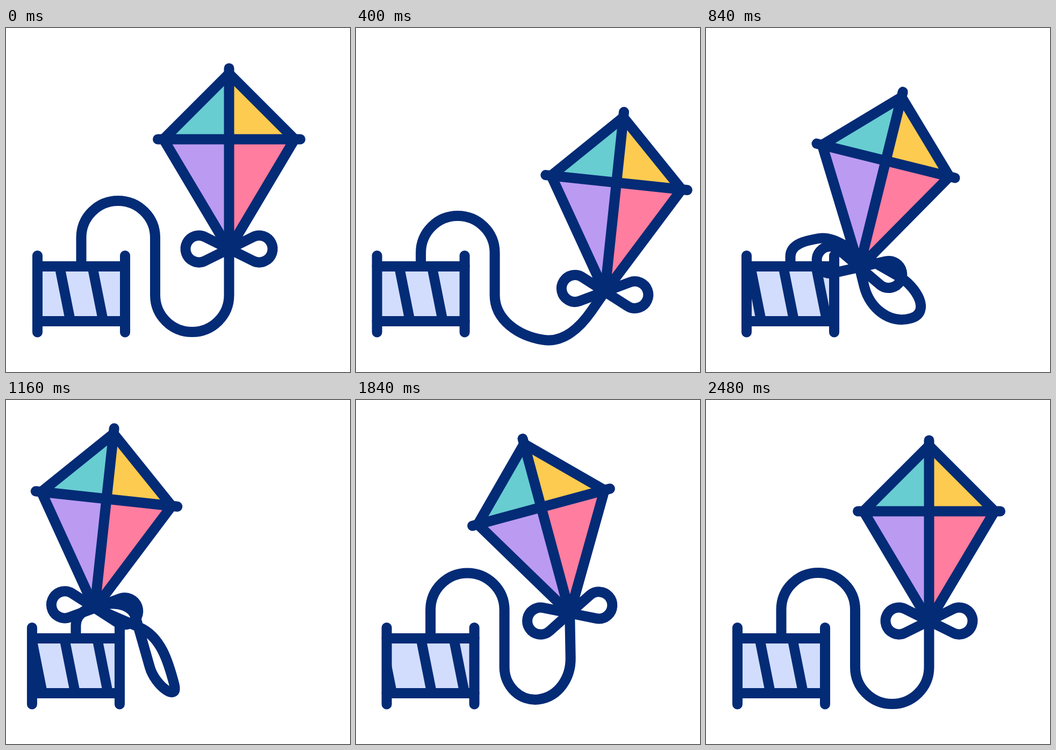
These frames come from a looping animation (640x640 px, 2.76 s). An HTML page with a canvas:

```html
<!DOCTYPE html>
<html lang="en">
<head>
<meta charset="utf-8">
<title>Kite</title>
<style>
  html, body { margin: 0; width: 100%; height: 100%; overflow: hidden; background: #fff; }
  canvas { display: block; width: 640px; height: 640px; }
</style>
</head>
<body>
<canvas id="stage" width="640" height="640"></canvas>
<script>
const ctx = document.getElementById('stage').getContext('2d');
const LOOP = 2760, MOVE_END = 2480, STEP = 40;
const INK = '#042b76', LINE = 19;

// Smooth motion through [time, value] keys; it rests at every turning point.
function follow(t, ...keys) {
  const last = keys.length - 1;
  if (t <= keys[0][0]) return keys[0][1];
  if (t >= keys[last][0]) return keys[last][1];
  const i = keys.findIndex(key => key[0] > t) - 1;
  const slope = n => {
    if (n === 0 || n === last) return 0;
    const [before, here, after] = keys.slice(n - 1, n + 2);
    if ((here[1] - before[1]) * (after[1] - here[1]) <= 0) return 0;
    return (after[1] - before[1]) / (after[0] - before[0]);
  };
  const [t0, from] = keys[i], [t1, to] = keys[i + 1];
  const span = t1 - t0, u = (t - t0) / span;
  return from + (to - from) * u * u * (3 - 2 * u) +
    span * u * (1 - u) * ((1 - u) * slope(i) - u * slope(i + 1));
}

// Rises from 0 to 1, holds, and falls back.
const swell = (t, a, b, c, d) => follow(t, [a, 0], [b, 1], [c, 1], [d, 0]);

function trace(points, closed) {
  ctx.beginPath();
  points.forEach(p => ctx.lineTo(p[0], p[1]));
  if (closed) ctx.closePath();
}

function strokeLine(...points) {
  trace(points);
  ctx.stroke();
}

function fillShape(color, points) {
  trace(points, true);
  ctx.fillStyle = color;
  ctx.fill();
}

function drawSpool(x, scroll) {
  const width = 163, top = 443.5, bottom = 545.5;
  ctx.save();
  ctx.translate(x, 0);
  ctx.save();
  ctx.beginPath();
  ctx.rect(0, top, width, bottom - top);
  ctx.clip();
  ctx.fillStyle = '#d2ddfd';
  ctx.fillRect(0, top, width, bottom - top);
  for (let i = 0; i < 5; i++) {
    const right = 52.5 + 61 * i + (i > 2 ? 13 : 0) + scroll;
    fillShape(INK, [[right - LINE, 453], [right, 453], [right + 16.5, 536], [right + 16.5 - LINE, 536]]);
  }
  ctx.restore();
  for (const y of [top, bottom]) strokeLine([0, y], [width, y]);
  for (const side of [0, width]) strokeLine([side, top - 20], [side, bottom + 20.5]);
  ctx.restore();
}

function heading(from, to) {
  const dx = to[0] - from[0], dy = to[1] - from[1], d = Math.hypot(dx, dy) || 1;
  return [dx / d, dy / d];
}

// Curve from p to q with the handle length of a circular arc of the same turn.
function bend(p, dirP, q, dirQ) {
  const cos = dirP[0] * dirQ[0] + dirP[1] * dirQ[1];
  const turn = Math.acos(Math.max(-1, Math.min(1, cos)));
  const h = Math.hypot(q[0] - p[0], q[1] - p[1]) / (3 * Math.cos(turn / 4) ** 2);
  ctx.bezierCurveTo(p[0] + h * dirP[0], p[1] + h * dirP[1],
    q[0] - h * dirQ[0], q[1] - h * dirQ[1], q[0], q[1]);
}

// An arch rising from the spool, then a dip that leads to the knot.
function drawString(t, spoolX, knot) {
  const fold = swell(t, 500, 840, 1480, 1900);
  const tangle = swell(t, 540, 840, 840, 1160);
  const taut = swell(t, 0, 400, 1480, 1900);
  const drop = 35 * swell(t, 0, 560, 900, 1900);
  const tuck = 0.9 * drop * fold;
  const sway = follow(t, [0, 0], [480, -27], [840, 9], [1160, 83], [1480, 42], [1900, 0]);

  const start = [spoolX + 81.5, 443.5];
  const left = [start[0], 390 + drop];
  const top = [spoolX + 150 - tuck / 2, 321.5 + drop * (1 + fold)];
  const right = [spoolX + 219 - tuck, 390 + drop * (1 - fold / 2)];
  const hinge = [spoolX + 219 + 64 * tangle, 497 - 35 * tangle];
  const exit = [knot[0] + sway, knot[1] + 86 - 50 * taut];
  const low = [(hinge[0] + exit[0]) / 2 + 55 * fold, (hinge[1] + exit[1]) / 2 + 68.5];

  const rise = heading(start, left), over = heading(left, right), fall = heading(right, hinge);
  const under = heading(hinge, exit), lift = heading(exit, knot);
  ctx.beginPath();
  ctx.moveTo(...start);
  ctx.lineTo(...left);
  bend(left, rise, top, over);
  bend(top, over, right, fall);
  ctx.lineTo(...hinge);
  bend(hinge, fall, low, under);
  bend(low, under, exit, lift);
  ctx.lineTo(...knot);
  ctx.stroke();
}

function drawBow(y) {
  const r = 25, dist = 56, angle = Math.acos(r / dist);
  for (const side of [-1, 1]) {
    ctx.save();
    ctx.translate(0, y);
    ctx.scale(side, 1);
    ctx.beginPath();
    ctx.moveTo(0, 0);
    ctx.arc(dist, 0, r, Math.PI + angle, Math.PI - angle);
    ctx.closePath();
    ctx.stroke();
    ctx.restore();
  }
}

function drawKite(x, y, angle) {
  const top = [0, -122], right = [122, 0], bottom = [0, 205], left = [-122, 0], mid = [0, 0];
  ctx.save();
  ctx.translate(x, y);
  ctx.rotate(angle);
  fillShape('#67cdd1', [top, mid, left]);
  fillShape('#fdcb50', [top, right, mid]);
  fillShape('#bb9af2', [left, mid, bottom]);
  fillShape('#ff7d9f', [mid, right, bottom]);
  trace([top, right, bottom, left], true);
  ctx.stroke();
  strokeLine([0, -132], [0, 204]);
  strokeLine([-132.5, 0], [132.5, 0]);
  drawBow(204);
  ctx.restore();
}

function draw(t) {
  const x = follow(t, [0, 415], [510, 494], [840, 334.5], [1160, 187], [1300, 147],
    [1480, 205.5], [1840, 344.5], [2200, 438], [MOVE_END, 415]);
  const y = follow(t, [0, 207], [480, 294], [1340, 170], [2060, 208], [MOVE_END, 207]);
  const tilt = follow(t, [0, 0], [880, 14], [1720, -16.2], [MOVE_END, 0]) * Math.PI / 180;
  const spoolX = follow(t, [0, 58.5], [420, 39], [840, 75.5], [1200, 47.5],
    [1520, 64], [2120, 51.5], [MOVE_END, 58.5]);
  const scroll = follow(t, [400, 0], [840, -34], [1160, -42], [1480, -113],
    [1840, -173.5], [MOVE_END, -196]);
  const knot = [x - 204 * Math.sin(tilt), y + 204 * Math.cos(tilt)];

  ctx.fillStyle = '#fff';
  ctx.fillRect(0, 0, 640, 640);
  ctx.strokeStyle = INK;
  ctx.lineWidth = LINE;
  ctx.lineCap = ctx.lineJoin = 'round';
  drawSpool(spoolX, scroll);
  drawString(t, spoolX, knot);
  drawKite(x, y, tilt);
}

const begin = performance.now();
function tick() {
  const t = (performance.now() - begin) % LOOP;
  draw(Math.min(MOVE_END, Math.floor(t / STEP) * STEP));
  requestAnimationFrame(tick);
}
tick();
</script>
</body>
</html>
```
